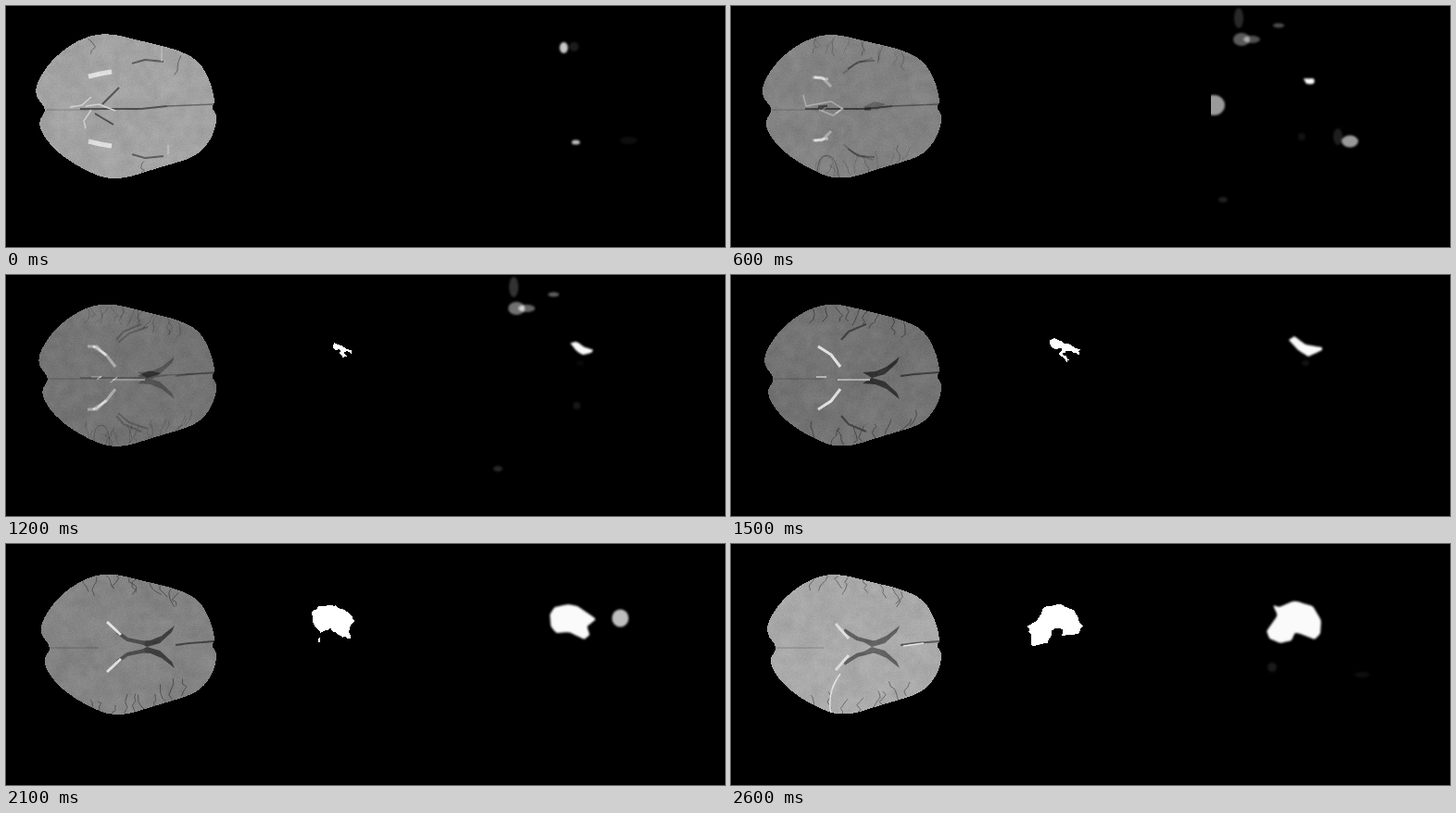
Animation of 776 by 260 pixels, one loop 2700 ms. Source, as an HTML page with a canvas:

```html
<!DOCTYPE html>
<html lang="en">
<head>
<meta charset="utf-8">
<title>Scan slices, mask and prediction</title>
<style>
  html, body { margin: 0; width: 100%; height: 100%; overflow: hidden; background: #000; }
  canvas { display: block; }
</style>
</head>
<body>
<canvas id="stage" width="776" height="260"></canvas>
<script>
const STEP = 100, STEPS = 27;
const KEYS = [0, 4, 9, 15, 19, 21, 26];
const BRAIN_W = 240, WORK_W = 400, WORK_H = 200, PANEL_X = 518, MIRROR = 222;

const nums = s => s.split(" ").map(Number);

const OUTLINE = nums("31 97 34 80 51 56 78 36 108 28 147 38 182 46 208 58 221 82 226 105 221 109 229 119 222 144 205 163 166 174 116 190 78 174 48 152 33 126 45 112");

// Per key slice: brightness, white plexus line, dark fissure, ventricle tone, number of folds
const SLICES = [
  { base: 163, plexus: "M89 76L102 73L114 71", fissure: "M136 62L150 58L170 60", vent: 0, folds: 3 },
  { base: 137, plexus: "M90 77L105 79", fissure: "M126 68L138 60L155 59", vent: 0, folds: 9 },
  { base: 119, plexus: "M88 77L98 77L108 87", fissure: "M121 73L133 63L153 56", vent: 0, folds: 12 },
  { base: 115, plexus: "M94 77L108 86L118 99", fissure: "M119 70L127 61L146 53", vent: 50, folds: 18 },
  { base: 120, plexus: "M109 85L116 94", fissure: "M117 92L131 103L150 107", vent: 48, folds: 20 },
  { base: 132, plexus: "M109 84L124 98", fissure: "M120 95L131 103L150 107", vent: 62, folds: 20 },
  { base: 170, plexus: "M113 86L127 102", fissure: "M122 93L136 102L152 106", vent: 95, folds: 16 }
];
const VENTRICLE = "M142 105L156 104L168 99L182 88L179 95L166 107L152 111Z";

// Single details: slice, grey, line width (0 fills), path
const ACCENTS = [
  [0, 80, 2, "M104 106L122 88M96 116L116 128"],
  [0, 210, 1.5, "M69 109L82 107L92 98M86 108L100 106L118 113M92 112L84 124L86 132"],
  [0, 205, 1, "M168 44V60M175 150V160"],
  [1, 205, 1.5, "M78 96L81 108L108 103L121 111L110 118L95 112"],
  [1, 30, 3, "M94 109L104 108M144 111H151"],
  [1, 65, 1, "M93 180Q94 160 104 161T117 187"],
  [2, 45, 0, "M142 109L155 103L167 106L158 112Z"],
  [2, 215, 1.5, "M98 113L103 109M113 116L120 110"],
  [2, 65, 1, "M95 181Q94 162 103 162T112 186"],
  [3, 180, 2, "M92 110H103M115 113H150"],
  [4, 185, 1.5, "M100 111H106M120 109H150"],
  [6, 225, 1.5, "M186 110L208 107M108 184Q103 160 118 140"]
];

// Ground truth mask per key, empty at first
const SEED = [364, 80];
const MASKS = [SEED, SEED].concat([
  "361 79 368 81 373 83 367 86",
  "343 72 348 67 358 73 364 74 376 81 376 87 364 81 358 85 366 91 362 93 353 84 360 79 348 80",
  "334 75 339 68 351 66 358 73 374 79 364 83 370 93 366 101 355 97 347 89 338 94 337 81",
  "330 73 338 67 354 66 369 73 376 82 371 89 371 103 360 99 350 91 340 95 338 107 338 94 332 87",
  "320 89 331 82 337 68 354 65 371 72 379 88 376 97 358 99 357 91 347 92 342 107 325 109 323 98"
].map(nums));

// Predicted main region per key
const REGIONS = [
  "622 79",
  "619 79 631 78 629 83 622 84",
  "616 77 625 78 630 83 626 86 619 83",
  "602 70 608 66 620 75 638 78 638 81 623 88 612 81",
  "590 76 594 67 607 65 617 70 621 82 627 90 628 99 621 102 599 91",
  "587 76 592 68 607 65 617 67 637 81 627 89 630 98 624 103 608 95 594 96 588 89",
  "578 94 590 77 585 66 592 68 608 61 628 67 637 82 636 97 630 103 609 95 605 104 593 107 581 102"
].map(nums);

// Smaller predicted spots: x, y, rx, ry, grey
const SPOTS = [
  [[602, 45, 4.5, 6, 200], [613, 44, 5, 5, 28], [615, 147, 4.5, 2.5, 190], [672, 145, 9, 4, 14]],
  [[521, 107, 12, 11, 255], [668, 146, 9, 6.5, 255], [655, 141, 5, 9, 50]],
  [[548, 13, 5, 11, 100], [551, 36, 9, 7, 225], [562, 36, 9, 4, 200], [591, 21, 6, 2.5, 190],
    [616, 141, 4, 4, 45], [531, 209, 5, 3, 80]],
  [[620, 95, 4, 3, 18]],
  [[640, 77, 15, 5, 235], [653, 85, 9, 9, 235], [619, 129, 2.5, 2.5, 90]],
  [[663, 80, 9, 9.5, 190]],
  [[584, 133, 5, 5, 26], [681, 141, 8, 3, 14]]
];

const grey = v => `rgb(${v},${v},${v})`;
const mix = (a, b, u) => a + (b - a) * u;
const layer = (w, h) => Object.assign(document.createElement("canvas"), { width: w, height: h })
  .getContext("2d", { willReadFrequently: true });

const stage = document.getElementById("stage").getContext("2d");
const work = layer(WORK_W, WORK_H);

function hash(x, y, z) {
  let h = Math.imul(x, 374761393) ^ Math.imul(y, 668265263) ^ Math.imul(z + 1, 1274126177);
  h = Math.imul(h ^ (h >>> 13), 1103515245);
  return ((h ^ (h >>> 16)) >>> 0) / 4294967296 - 0.5;
}

// Value noise on a grid of the given cell size
function cloud(x, y, z, cell) {
  const i = Math.floor(x / cell), j = Math.floor(y / cell);
  const u = x / cell - i, v = y / cell - j;
  return mix(mix(hash(i, j, z), hash(i + 1, j, z), u),
    mix(hash(i, j + 1, z), hash(i + 1, j + 1, z), u), v);
}

// Point at fraction s along a closed list of x, y pairs
function pointAt(list, s) {
  const n = list.length / 2, f = s * n, i = Math.floor(f) % n, j = (i + 1) % n, u = f % 1;
  return [mix(list[2 * i], list[2 * j], u), mix(list[2 * i + 1], list[2 * j + 1], u)];
}

function morph(a, b, u, count) {
  return Array.from({ length: count }, (_, i) => {
    const p = pointAt(a, i / count), q = pointAt(b, i / count);
    return [mix(p[0], q[0], u), mix(p[1], q[1], u)];
  });
}

// Closed curve through the midpoints of the given points
function fillShape(ctx, pts) {
  const n = pts.length;
  ctx.beginPath();
  for (let i = 0; i <= n; i++) {
    const p = pts[i % n], q = pts[(i + 1) % n], mx = (p[0] + q[0]) / 2, my = (p[1] + q[1]) / 2;
    if (i) ctx.quadraticCurveTo(p[0], p[1], mx, my);
    else ctx.moveTo(mx, my);
  }
  ctx.fill();
}

function mark(ctx, tone, width, d) {
  const path = new Path2D(d);
  ctx.fillStyle = ctx.strokeStyle = grey(tone);
  ctx.lineWidth = width;
  if (width) ctx.stroke(path); else ctx.fill(path);
}

function markBoth(ctx, ...args) {
  mark(ctx, ...args);
  ctx.save();
  ctx.transform(1, 0, 0, -1, 0, MIRROR);
  mark(ctx, ...args);
  ctx.restore();
}

// Thin winding lines that run inward from the rim
function drawFolds(ctx, k, base, count) {
  for (let i = 0; i < count; i++) {
    const low = i % 2, dir = low ? -1 : 1;
    let x = mix(85, 195, (i + 0.5 + hash(i, k, 5)) / count);
    const bend = ((x - 108) / 95) ** 2 * 26;
    let y = (low ? 186 : 31) + dir * (bend + 2 + 4 * Math.abs(hash(i, k, 6)));
    let d = `M${x} ${y}`;
    for (let s = 0; s < 4; s++) {
      x += hash(i, s, k + 7) * 9;
      y += dir * (4 + hash(i, s, k + 30) * 5);
      d += `L${x} ${y}`;
    }
    mark(ctx, base * 0.62, 1, d);
  }
}

const slices = SLICES.map(({ base, plexus, fissure, vent, folds }, k) => {
  const ctx = layer(BRAIN_W, WORK_H);
  ctx.fillStyle = grey(base);
  ctx.fillRect(0, 0, BRAIN_W, WORK_H);
  ctx.lineJoin = "round";
  drawFolds(ctx, k, base, folds);
  mark(ctx, base * 0.78, 1, "M44 112H100");
  mark(ctx, base * 0.5, 2, vent ? "M183 109L198 107L225 105" : "M80 111H120L146 111L174 108");
  if (!vent) mark(ctx, base * 0.62, 1.5, "M174 108L224 106");
  if (vent) markBoth(ctx, vent, 0, VENTRICLE);
  markBoth(ctx, base * 0.56, k > 3 ? 4 : 2, fissure);
  markBoth(ctx, 222, k ? 3 : 5, plexus);
  for (const [slice, ...args] of ACCENTS) if (slice === k) mark(ctx, ...args);
  return ctx.canvas;
});

// Hard pixel edges for brain and mask, grain inside the brain
function finish(step, k) {
  const img = work.getImageData(0, 0, WORK_W, WORK_H), d = img.data;
  for (let y = 0, i = 0; y < WORK_H; y++) {
    for (let x = 0; x < WORK_W; x++, i += 4) {
      if (d[i + 3] < 128) { d[i + 3] = 0; continue; }
      d[i + 3] = 255;
      if (x >= BRAIN_W) continue;
      const n = hash(x, y, step) * 10 + cloud(x, y, k, 7) * 11 + cloud(x, y, k + 20, 22) * 9;
      for (let c = 0; c < 3; c++) d[i + c] += n;
    }
  }
  work.putImageData(img, 0, 0);
}

// The brain narrows slightly towards the last slice
function outlineAt(u) {
  return morph(OUTLINE, OUTLINE, 0, OUTLINE.length / 2)
    .map(([x, y]) => [226 - (226 - x) * (1 - 0.035 * u), 112 - (112 - y) * (1 - 0.035 * u)]);
}

function drawScan(step, k, next, u) {
  work.clearRect(0, 0, WORK_W, WORK_H);
  work.drawImage(slices[k], 0, 0);
  work.globalAlpha = u;
  work.drawImage(slices[next], 0, 0);
  work.globalAlpha = 1;
  work.globalCompositeOperation = "destination-in";
  fillShape(work, outlineAt(step / (STEPS - 1)));
  work.globalCompositeOperation = "source-over";
  if (step > 7) {
    work.fillStyle = "#fff";
    const rough = step > 9 ? 2.4 : 0;
    fillShape(work, morph(MASKS[k], MASKS[next], u, 78)
      .map(([x, y], i) => [x + hash(i, step, 3) * rough, y + hash(i, step, 4) * rough]));
  }
  finish(step, k);
  stage.drawImage(work.canvas, 0, 0);
}

function drawSpots(k, weight) {
  stage.globalAlpha = weight;
  for (const [x, y, rx, ry, tone] of SPOTS[k]) {
    stage.fillStyle = grey(tone);
    stage.beginPath();
    stage.ellipse(x, y, rx, ry, 0, 0, 7);
    stage.fill();
  }
}

function drawPrediction(k, next, u) {
  stage.save();
  stage.beginPath();
  stage.rect(PANEL_X, 0, 258, 260);
  stage.clip();
  stage.filter = "blur(1.2px)";
  stage.globalCompositeOperation = "lighter";
  stage.fillStyle = "#fafafa";
  fillShape(stage, morph(REGIONS[k], REGIONS[next], u, 60));
  drawSpots(k, 1 - u);
  if (u) drawSpots(next, u);
  stage.restore();
}

function draw(step) {
  const k = KEYS.findLastIndex(v => v <= step), next = Math.min(k + 1, KEYS.length - 1);
  const u = next > k ? (step - KEYS[k]) / (KEYS[next] - KEYS[k]) : 0;
  stage.fillStyle = "#000";
  stage.fillRect(0, 0, 776, 260);
  drawScan(step, k, next, u);
  drawPrediction(k, next, u);
}

let shown = -1;
function tick() {
  const step = Math.floor(performance.now() / STEP) % STEPS;
  if (step !== shown) draw(shown = step);
  requestAnimationFrame(tick);
}
tick();
</script>
</body>
</html>
```
